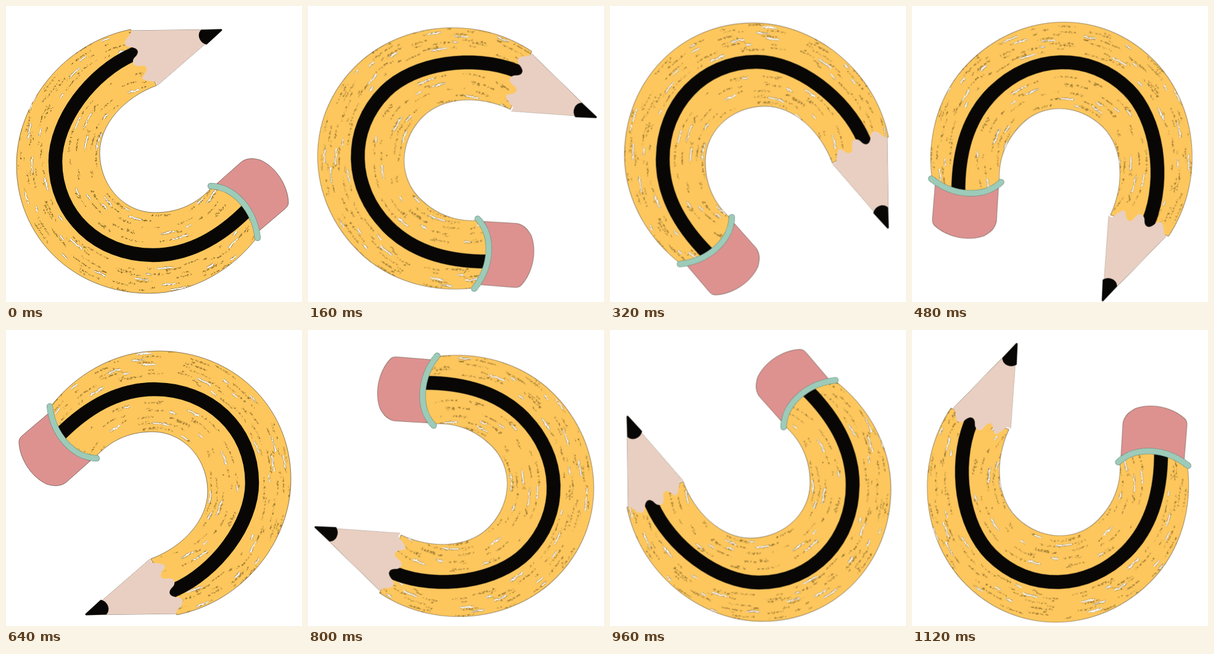
Write an HTML page without scripts that moves like this. It is 480 by 480 pixels and loops after 1280 ms.

```html
<!DOCTYPE html>
<html lang="en">
<head>
<meta charset="utf-8">
<title>Rolling pencil</title>
<style>
  html, body { margin: 0; width: 100%; height: 100%; overflow: hidden; background: #fff; }
  svg { display: block; width: 100vw; height: 100vh; }
  .pencil { transform-origin: 239.5px 250px; animation: roll 1280ms steps(8, end) infinite; }
  .grain { animation: regrain 1280ms steps(8, end) infinite; }
  .tip { animation: nudge 320ms step-end infinite; }
  .edge { stroke: #3d3222; stroke-width: .8; stroke-opacity: .75; }
  .arcs { fill: none; }
  .scuff { stroke: #7a5c20; stroke-opacity: .8; stroke-width: 1.8; stroke-dasharray: 26 48 11 66 38 90 8 37; }
  .rim { stroke: #6b5220; stroke-width: 2.9; }
  .gap { stroke: #fff; stroke-width: 2.1; }
  .rim, .gap { stroke-dasharray: 21 135 9 112 26 180 12 98; }
  @keyframes roll { to { transform: rotate(360deg); } }
  @keyframes regrain { to { transform: rotate(1048deg); } }
  @keyframes nudge { 50% { transform: translate(2px, 1px); } }
</style>
</head>
<body>
<svg viewBox="0 0 480 480">
  <defs>
    <path id="body" d="M202 38C93 60 17 158 17 258C17 375 110 466 232 466C305 466 370 425 408 374C403 330 370 293 332 296C310 320 280 335 242 335C190 335 152 290 152 238C152 192 192 148 244 129Z"/>
    <path id="band" d="M332 292C370 293 403 330 408 376"/>
    <clipPath id="inBody"><use href="#body"/></clipPath>
    <g id="arcs">
      <circle r="94" transform="rotate(20)"/>
      <circle r="103" transform="rotate(131)"/>
      <circle r="113" transform="rotate(247)"/>
      <circle r="124" transform="rotate(75)"/>
      <circle r="136" transform="rotate(310)"/>
      <circle r="180" transform="rotate(163)"/>
      <circle r="189" transform="rotate(44)"/>
      <circle r="198" transform="rotate(281)"/>
      <circle r="207" transform="rotate(112)"/>
      <circle r="216" transform="rotate(205)"/>
    </g>
    <filter id="rough" x="-10%" y="-10%" width="120%" height="120%" color-interpolation-filters="sRGB">
      <feTurbulence type="fractalNoise" baseFrequency=".12" numOctaves="2" seed="4"/>
      <feDisplacementMap in="SourceGraphic" scale="4" xChannelSelector="R" yChannelSelector="G"/>
    </filter>
    <filter id="speckle" x="-10%" y="-10%" width="120%" height="120%" color-interpolation-filters="sRGB">
      <feTurbulence type="fractalNoise" baseFrequency=".3" numOctaves="2" seed="9" result="noise"/>
      <feColorMatrix in="noise" values="0 0 0 0 0  0 0 0 0 0  0 0 0 0 0  8 0 0 0 -3.600" result="holes"/>
      <feDisplacementMap in="SourceGraphic" in2="noise" scale="4" xChannelSelector="G" yChannelSelector="B"/>
      <feComposite in2="holes" operator="in"/>
    </filter>
  </defs>

  <g class="pencil">
    <use href="#body" class="edge" fill="#fdc75d"/>
    <g clip-path="url(#inBody)">
      <g transform="translate(240 246)">
        <g class="grain arcs">
          <g class="scuff" filter="url(#speckle)">
            <use href="#arcs" transform="rotate(57)"/>
            <use href="#arcs" transform="rotate(170) scale(1.020)"/>
          </g>
          <g filter="url(#rough)">
            <use href="#arcs" class="rim"/>
            <use href="#arcs" class="gap"/>
          </g>
        </g>
      </g>
    </g>

    <path fill="none" stroke="#080705" stroke-width="22.500" d="M216 74.500L207 78C138 108 80 186 80 252C80 340 150 404 238 404C300 404 350 372 392 330"/>

    <g class="tip">
      <path class="edge" fill="none" d="M203 40L350 38L245 129"/>
      <path fill="#e9cfc1" d="M203 40C203 48 190 56 193 62C196 68 203 66 208 68C216 71 215 77 209 83C203 89 206 97 212 97C218 98 223 95 227 99C231 104 224 110 221 116C222 122 232 121 243 123L245 129L350 38Z"/>
      <path fill="#080705" stroke="#080705" stroke-width="3" stroke-linejoin="round" d="M349 39L317 40C311 47 315 58 325 61Z"/>
    </g>

    <path class="edge" fill="#dd9290" d="M342 288L378 256C388 246 400 246 413 250C439 262 457 292 458 318C458 324 455 327 450 331L410 365C404 340 380 300 342 288Z"/>
    <g fill="none" stroke-linecap="round">
      <use href="#band" stroke="#5c7a6c" stroke-width="10"/>
      <use href="#band" stroke="#9dcbb9" stroke-width="9"/>
    </g>
  </g>
</svg>
</body>
</html>
```
